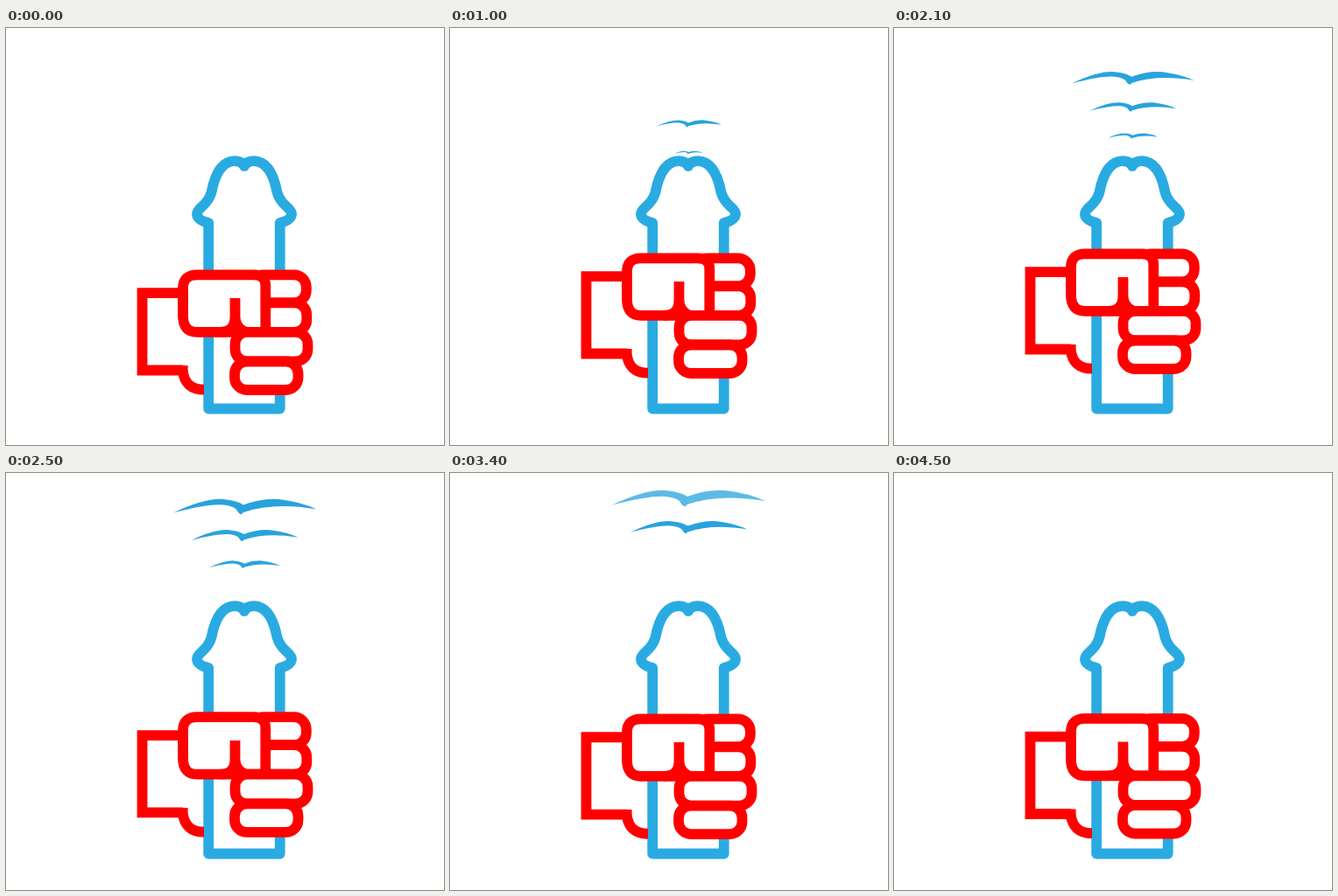
Animation, 500 px wide and 477 px high, one loop 4.6 s. Source, as an HTML page:

```html
<!DOCTYPE html>
<html lang="en">
<head>
<meta charset="utf-8">
<title>Loop</title>
<style>
  html, body { margin: 0; width: 100%; height: 100%; overflow: hidden; background: #fff; }
  svg { display: block; width: 500px; height: 477px; }
  #shaft { fill: #fff; stroke: #29abe2; stroke-width: 11.8; stroke-linejoin: round; stroke-linecap: round; }
  #hand { fill: #fff; stroke: #f00; stroke-width: 11.8; }
  #birds { fill: #29a3dc; }
</style>
</head>
<body>
<svg viewBox="0 0 500 477">
  <defs>
    <path id="bird" d="M-50 .5Q-28-10-15-9Q-5-8-1-5Q12-10 24-9Q40-7 50-2Q20-7-1 .2L-2.5 1.6Q-4.5 1-6-2Q-9-4.5-15-5Q-25-6-50 .5Z"/>
  </defs>
  <g id="birds">
    <use href="#bird"/><use href="#bird"/><use href="#bird"/>
  </g>
  <g id="shaft">
    <path d="M231.2 223V435.5H312.7V223"/>
    <path d="M231.2 223Q218 219.5 218 212.5C218.5 205 230 204 234.5 188C238 170 245 152.5 261 152.2Q268 152 272 157
             Q276 152 283 152.2C299 152.5 306 170 309.5 188C314 204 325.5 205 326 212.5Q326 219.5 312.7 223"/>
    <path d="M272 157v1"/>
  </g>
  <g id="hand">
    <path d="M202 303.2H155.5V391.5H202"/>
    <path d="M201.7 386V391.5Q204 413.7 226 413.7" fill="none"/>
    <rect x="280" y="282.3" width="62.8" height="32" rx="14"/>
    <rect x="280" y="314.3" width="63.3" height="33.5" rx="14"/>
    <path d="M218 282.3H283Q296.3 282.3 296.3 295V347.8H218Q202 347.8 202 329V298Q202 282.3 218 282.3Z"/>
    <rect x="261.5" y="347.8" width="83" height="33.7" rx="14"/>
    <rect x="261" y="381.5" width="72.5" height="32.5" rx="14"/>
    <path d="M261.5 309V330Q261.5 347.8 244 347.8M261.5 330Q261.5 342 272 347" fill="none"/>
  </g>
</svg>
<script>
const LOOP = 4600, STEP = 100, STROKE = 37.5;
// [seconds, strokes completed]
const pace = [[0, 0], [.2, .06], [1, .748], [1.6, 1.287], [2.1, 1.705],
              [2.9, 2.48], [3.9, 3.417], [4.5, 3.936], [4.6, 4]];
const hand = document.getElementById('hand');
const birds = [...document.querySelectorAll('#birds use')];
const clamp = v => Math.max(0, Math.min(1, v));

function strokes(t) {
  const i = Math.max(1, pace.findIndex(p => p[0] >= t));
  const [t0, a] = pace[i - 1], [t1, b] = pace[i];
  return a + (b - a) * (t - t0) / (t1 - t0);
}

function draw(t) {
  const lift = STROKE * (1 - Math.cos(2 * Math.PI * strokes(t))) / 2;
  hand.setAttribute('transform', `translate(0 ${-lift})`);
  birds.forEach((bird, i) => {
    const age = t - .7 * i;
    const y = Math.max(26, 157.2 - 45 * age);
    const width = Math.max(0, 58 + (125 - y) * 1.31);
    bird.setAttribute('transform', `translate(272.7 ${y}) scale(${width / 100})`);
    bird.setAttribute('opacity', clamp((age - .1) / .2) * clamp((3 - age) / .4));
  });
}

const start = performance.now();
function tick() {
  const ms = (performance.now() - start) % LOOP;
  draw(Math.floor(ms / STEP) * STEP / 1000);
  requestAnimationFrame(tick);
}
tick();
</script>
</body>
</html>
```
